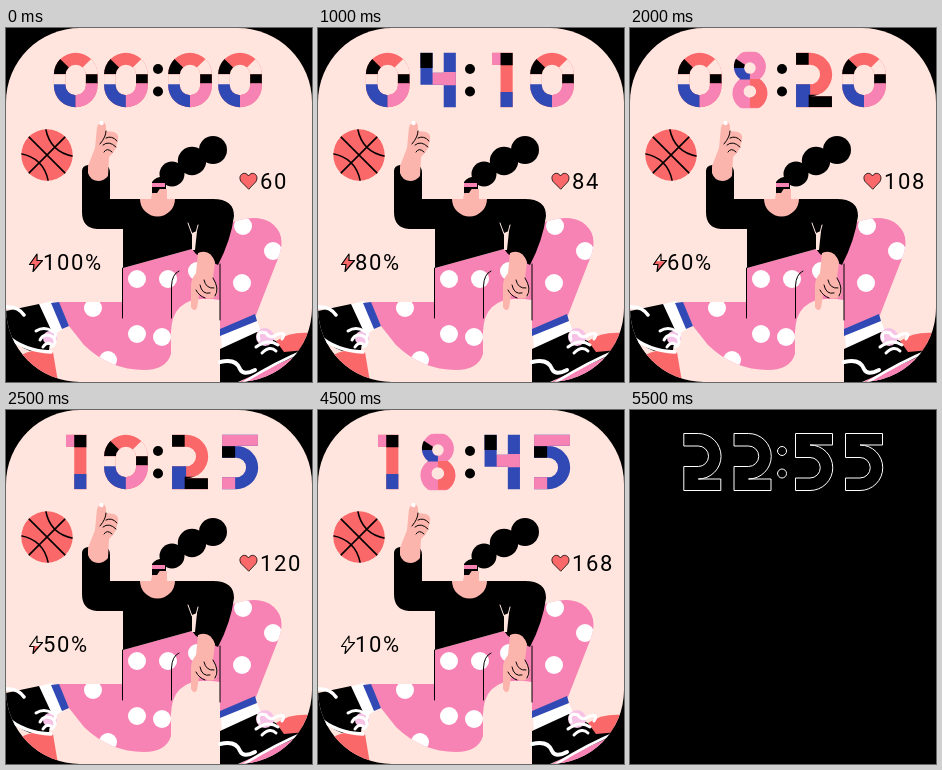
Write an HTML page with a canvas that moves like this. It is 306 by 354 pixels and loops after 6 s.

```html
<!DOCTYPE html>
<html>
<head>
<meta charset="utf-8">
<style>
html, body { margin: 0; width: 100%; height: 100%; overflow: hidden; background: #000; }
canvas { display: block; }
</style>
</head>
<body>
<canvas id="face" width="306" height="354"></canvas>
<script>
const ctx = document.getElementById('face').getContext('2d');
const BG = '#ffe5dd', INK = '#000', CORAL = '#fb6869', PINK = '#f783b5',
      BLUE = '#3049b5', SKIN = '#fcb5ad', WHITE = '#fff', LILAC = '#f6c3e6';
const STEP = 500, LOOP = 6000;

const ring = (x, y, r) => `M${x - r} ${y}a${r} ${r} 0 1 0 ${2 * r} 0a${r} ${r} 0 1 0 ${-2 * r} 0Z`;
const box = (x, y, w, h) => `M${x} ${y}h${w}v${h}h${-w}Z`;

// Numerals: centred on x = 0, 57 units tall
const glyphs = {
  0: 'M-22.5 22.5A22.5 22.5 0 0 1 22.5 22.5V34.5A22.5 22.5 0 0 1-22.5 34.5Z' +
     'M-10.5 23A10.5 10.5 0 0 1 10.5 23V34A10.5 10.5 0 0 1-10.5 34Z',
  1: 'M-10 0H11V57H-1.5V12.5H-10Z',
  2: 'M-18.5 0H-4A22.75 22.75 0 0 1-4 45.5H18.5V57H-18.5V33H-4A10.25 10.25 0 0 0-4 12.5H-18.5Z',
  3: 'M-17.5 0H2A15.5 15.5 0 0 1 10.5 28.5A15.5 15.5 0 0 1 2 57H-17.5V45H0A5.5 5.5 0 0 0 0 34H-13V23H0A5.5 5.5 0 0 0 0 12H-17.5Z',
  4: 'M-18 0H-5.5V21H6V0H18.5V57H6V33.5H-18Z',
  5: 'M-18.5 57H-4A22.75 22.75 0 0 0-4 11.5H18.5V0H-18.5V24H-4A10.25 10.25 0 0 1-4 44.5H-18.5Z',
  6: 'M6 0C-10 6-18.5 22-18.5 38.5A18.5 18.5 0 1 0 0 20L12 0Z' + ring(0, 38.5, 6.5),
  8: 'M-10 27.5A16.5 16.5 0 1 1 10 27.5A18 18 0 1 1-10 27.5Z' + ring(0, 16, 6) + ring(0, 40.5, 6.5)
};
// Colour blocks: base, then [colour, path]
const blocks = {
  0: [CORAL, [INK, 'M0 22.5H-25V-2.5Z'], [BG, 'M0 22.5H25V-2.5Z'], [BG, box(-24, 22.5, 20, 12)],
      [INK, box(5, 22.5, 20, 10)], [BLUE, box(-24, 33, 24, 25)], [PINK, box(0, 32, 24, 26)]],
  1: [CORAL, [INK, box(-2, 0, 14, 13)], [PINK, box(-11, 0, 9.5, 13)], [BLUE, box(-3, 41, 15, 16)]],
  2: [CORAL, [INK, box(-19, 0, 13.5, 13)], [BLUE, box(-19, 30, 15, 27)], [INK, box(-5.5, 44, 25, 13)]],
  3: [CORAL, [INK, box(-18, 0, 20, 13)], [PINK, box(-18, 20, 18, 9)], [BLUE, box(-18, 43, 18, 14)]],
  4: [BLUE, [INK, box(-19, 0, 14, 16)], [PINK, box(-5.5, 20, 25, 14)]],
  5: [BLUE, [PINK, box(-19, 0, 38, 12)], [INK, box(-19, 12, 14, 13)], [PINK, box(-19, 43, 14, 14)]],
  6: [PINK, [INK, box(-4, 0, 20, 15)], [CORAL, box(0, 20, 20, 18)], [BLUE, box(-20, 38, 20, 20)]],
  8: [PINK, [INK, 'M0 16H-18V4Z'], [BLUE, box(-18, 16, 18, 12)], [CORAL, box(0, 27.5, 19, 30)]]
};
const slots = [69.7, 119.9, 184, 234];

const path = d => new Path2D(d);
function fill(d, color) {
  ctx.fillStyle = color;
  ctx.fill(path(d), 'evenodd');
}
function line(d, width = 1, color = INK) {
  ctx.strokeStyle = color;
  ctx.lineWidth = width;
  ctx.lineCap = ctx.lineJoin = 'round';
  ctx.stroke(path(d));
}
const dot = (x, y, r, color) => fill(ring(x, y, r), color);

function numeral(n, slot, dim) {
  const shift = n == 2 && slot < 2 ? 2.6 : 0;
  ctx.save();
  ctx.translate(slots[slot] + shift, 23.5);
  if (dim) {
    ctx.lineJoin = 'miter';
    ctx.lineWidth = 1;
    ctx.strokeStyle = WHITE;
    ctx.stroke(path(glyphs[n]));
  } else {
    ctx.translate(0, 1.3);
    ctx.scale(.97, .955);
    ctx.clip(path(glyphs[n]), 'evenodd');
    const [base, ...parts] = blocks[n];
    fill(box(-24, -1, 48, 59), base);
    for (const [color, shape] of parts) fill(shape, color);
  }
  ctx.restore();
}

function clock(k, dim) {
  const pad = n => String(n).padStart(2, '0');
  [...pad(2 * k) + pad(5 * k)].forEach((n, i) => numeral(n, i, dim));
  for (const y of [41, 63.5]) {
    if (dim) line(ring(152, y, 4.5), 1, WHITE);
    else dot(152, y, 5, INK);
  }
}

function ball() {
  ctx.save();
  ctx.translate(41, 127);
  dot(0, 0, 25.7, CORAL);
  ctx.clip(path(ring(0, 0, 25.7)));
  ctx.rotate(-Math.PI / 4);
  line('M-26 0H26M0-26V26M-18-20Q-4 0-18 20M18-20Q4 0 18 20', 1.6);
  ctx.restore();
}

function pants() {
  const legs = 'M117 240L186 221L190 225L222 196C236 190 252 187 264 194C276 202 278 214 273 228' +
    'L250 287L214 302V272Q166 264 165 304V326Q160 342 138 342Q104 342 78 317L63 298L52 274H116Z';
  fill(legs, PINK);
  ctx.save();
  ctx.clip(path(legs));
  const spots = [[131, 251], [162, 251], [191, 243], [87, 280], [131, 306], [102, 332], [156, 309],
    [237, 198], [267, 223], [236, 255]];
  for (const [x, y] of spots) dot(x, y, 9, WHITE);
  ctx.restore();
  line('M116.5 240V290M165.5 290V258Q166 246 173 243M214 236V292');
}

function leftShoe() {
  fill('M8 332Q24 318 47 324L52 354H8Z', CORAL);
  fill('M30 277L46 273L57 301L45 308Z', WHITE);
  fill('M45 275L53 274L63 298L56 301Z', BLUE);
  fill('M0 283L33 276L46 304L43 322L24 323Q10 318 0 304Z', INK);
  line('M0 279Q12 278 18 287M0 307Q18 323 45 324', 3.5, WHITE);
  dot(44, 310, 7, LILAC);
  line('M30 303Q38 298 46 303Q52 305 48 310M34 312Q38 304 47 309Q52 315 45 319M37 319Q42 312 47 318', 3, WHITE);
}

function rightShoe() {
  fill('M290 324L306 316V354H234L266 334Z', PINK);
  fill('M215 307L251 293L256 306L216 322Z', WHITE);
  fill('M214 301L249 286L251 293L214 308Z', BLUE);
  fill('M214 321L251 304L276 316L303 318L290 328L232 354H214Z', INK);
  fill('M270 313Q284 303 306 305L300 322L278 324Z', CORAL);
  dot(259, 309, 9, LILAC);
  line('M302 321Q270 334 238 354', 2.5, WHITE);
  line('M214 334Q230 330 234 341Q237 348 249 342', 4, WHITE);
  line('M253 312Q250 302 260 305Q264 312 272 306Q281 304 276 311M250 319Q262 310 272 317M256 325Q264 317 270 323', 3, WHITE);
}

function person() {
  pants();
  // braid, head and neck
  dot(207, 122, 14, INK);
  dot(186, 133, 14.2, INK);
  dot(166, 146, 12.5, INK);
  fill('M146 154Q150 148 160 149V166H146Z', INK);
  fill('M76 143Q76 138 82 137H99Q104 138 104 145V171H207Q228 171 228 188Q225 212 212 237L190 226L186 221L117 240V201H91Q76 200 76 184Z', INK);
  fill('M134 171H145L147 161H161V171H169A17.5 17.5 0 0 1 134 171Z', SKIN);
  fill('M146 155H159V159H146Z', PINK);
  fill('M146 160L155 159L151 165H146Z', INK);
  fill('M186 205L191 203L189 222H186Z', BG);
  line('M182 195L186 206M192 197L190 205', 1, BG);
  // raised hand
  fill('M82 138L89 120L91 99Q93 94 97 94Q101 95 100 103L108 104Q113 106 112 111L110 120Q107 126 103 129L102 148Q98 153 92 153Q84 152 82 145Z', SKIN);
  line('M100 103Q100 109 94 116M100 110Q106 107 111 113M97 117Q103 112 110 119M98 124Q101 119 106 124');
  dot(95.5, 95, 2.2, WHITE);
  // lowered hand
  fill('M192 225Q204 220 209 234L207 250Q214 260 211 267Q207 272 201 270L193 267L191 280Q188 285 185 279V262Q184 252 190 245Z', SKIN);
  line('M207 250Q214 261 209 268M198 252Q200 261 208 260M194 257Q196 267 204 265M190 262Q193 268 199 270');
  leftShoe();
  rightShoe();
}

function stats(k) {
  ctx.font = '400 22px Roboto, Arial, sans-serif';
  ctx.letterSpacing = '1.6px';
  ctx.fillStyle = INK;
  ctx.fillText(60 + 12 * k, 254, 161);
  ctx.fillText(100 - 10 * k + '%', 37, 242);

  const heart = 'M242.5 161L235 153.5C231 147 239 142 242.5 148C246 142 254 147 250 153.5Z';
  fill(heart, CORAL);
  line(heart, .8);

  const bolt = 'M31 226L23.5 236.5H28L27 243.5L36.5 232.5H31Z';
  const level = [1, 1, .8, .6, .6, .45, .3, .3, .12, 0][k];
  ctx.save();
  ctx.beginPath();
  ctx.rect(20, 244 - 18 * level, 20, 18 * level);
  ctx.clip();
  fill(bolt, CORAL);
  ctx.restore();
  line(bolt, 1.2);
}

function draw(k) {
  ctx.fillStyle = INK;
  ctx.fillRect(0, 0, 306, 354);
  const dim = k > 9;
  ctx.save();
  if (!dim) {
    ctx.beginPath();
    ctx.roundRect(0, 0, 306, 354, 74);
    ctx.clip();
    ctx.fillStyle = BG;
    ctx.fillRect(0, 0, 306, 354);
    ball();
    person();
    stats(k);
  }
  clock(k, dim);
  ctx.restore();
}

const start = performance.now();
let shown = 0;
function tick() {
  const k = Math.floor((performance.now() - start) % LOOP / STEP);
  if (k !== shown) draw(shown = k);
  requestAnimationFrame(tick);
}
draw(0);
tick();
</script>
</body>
</html>
```
